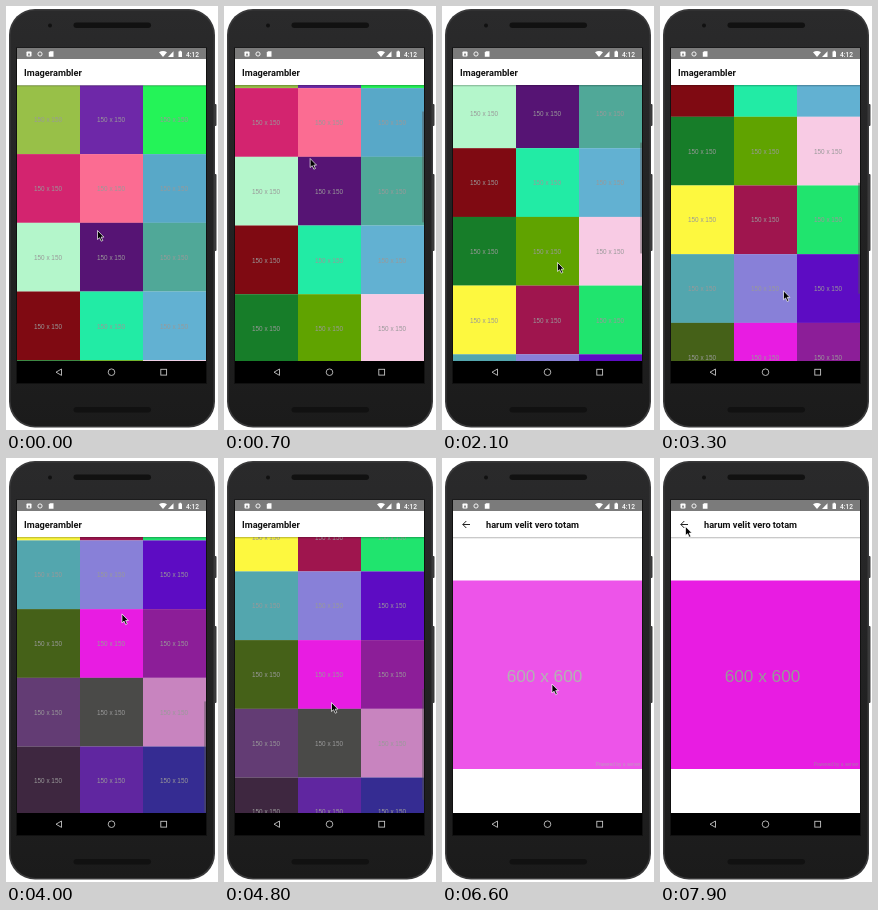
An HTML page that plays this animation: 212 by 424 pixels, repeating every 8 s.

```html
<!DOCTYPE html>
<html lang="en">
<head>
<meta charset="utf-8">
<title>Photo grid</title>
<style>
  html, body { margin: 0; width: 100%; height: 100%; overflow: hidden; background: #fff; }
  svg { display: block; width: 100%; height: 100%; }
  .title { font: 700 9.2px Roboto, sans-serif; fill: #111; }
  .label { font-family: "Liberation Sans", Arial, sans-serif; fill: #999; text-anchor: middle; }
  .clock { font: 500 6.6px Roboto, sans-serif; fill: #fff; }
  .mark { font: 4.9px "Liberation Sans", Arial, sans-serif; fill: #a77ba6; text-anchor: end; }
</style>
</head>
<body>
<svg viewBox="0 0 212 424">
  <defs>
    <clipPath id="listArea"><rect x="11" y="79" width="189" height="276"/></clipPath>
    <clipPath id="appArea"><rect x="11" y="53" width="189" height="302"/></clipPath>
    <linearGradient id="shade" x2="0" y2="1">
      <stop stop-color="#000" stop-opacity=".28"/>
      <stop offset="1" stop-color="#000" stop-opacity="0"/>
    </linearGradient>
    <linearGradient id="body" x2="0" y2="1">
      <stop stop-color="#2a2a2b"/>
      <stop offset="1" stop-color="#1b1b1b"/>
    </linearGradient>
  </defs>

  <!-- Phone -->
  <g fill="#3a3a3b">
    <rect x="206" y="98" width="4.5" height="22" rx="1"/>
    <rect x="206" y="168" width="4.5" height="77" rx="1"/>
  </g>
  <rect x="3" y="3" width="206" height="418.5" rx="26" fill="#3a3a3b"/>
  <rect x="4.5" y="4.5" width="203" height="415.5" rx="25" fill="url(#body)"/>
  <g fill="#111">
    <rect x="67.5" y="16.5" width="77.5" height="5.5" rx="2.75"/>
    <rect x="67.5" y="401" width="77.5" height="5.5" rx="2.75"/>
    <circle cx="44" cy="19.5" r="2"/>
  </g>
  <rect x="10" y="41.5" width="191" height="336.5" fill="#111"/>

  <!-- App: grid page and detail page -->
  <rect x="11" y="53" width="189" height="302" fill="#fff"/>
  <g clip-path="url(#listArea)">
    <g id="grid"></g>
    <rect id="thumb" x="198.2" width="1.8" fill="#555" fill-opacity=".5"/>
  </g>
  <rect x="11" y="79" width="189" height="2" fill="url(#shade)"/>
  <text class="title" x="18" y="70">Imagerambler</text>

  <g clip-path="url(#appArea)">
    <g id="detail">
      <rect x="11" y="53" width="189" height="352" fill="#fff"/>
      <rect x="11" y="79" width="189" height="2" fill="url(#shade)"/>
      <path d="M28 66.5H20.8M24.3 63L20.8 66.5L24.3 70" fill="none" stroke="#222"/>
      <text class="title" x="44" y="70">harum velit vero totam</text>
      <g id="photo">
        <rect x="11" y="122.5" width="189" height="188.5" fill="#e81ce2"/>
        <text class="label" x="102.5" y="223.5" font-size="17.2">600 x 600</text>
        <text class="mark" x="198.5" y="308">Powered by a server</text>
      </g>
    </g>
  </g>

  <!-- Status bar -->
  <rect x="11" y="42" width="189" height="11" fill="#7b7b7b"/>
  <g fill="#fff">
    <rect x="20.5" y="45.5" width="5" height="5" rx=".8"/>
    <path d="M23 46.6L21.7 49.5H24.3Z" fill="#7b7b7b"/>
    <circle cx="34" cy="48" r="2.1" fill="none" stroke="#fff" stroke-width=".9"/>
    <path d="M44 45.3H47.5V50.7H42.8V46.6Z"/>
    <path d="M153 46.3Q157 43.5 161 46.3L157 51Z"/>
    <path d="M167.5 45.3V51H162Z"/>
    <path d="M172.5 45.5H173.5V44.8H175V45.5H176V51H172.5Z"/>
  </g>
  <text class="clock" x="180" y="50.5">4:12</text>

  <!-- Navigation bar -->
  <rect x="11" y="355" width="189" height="22" fill="#000"/>
  <g fill="none" stroke="#c4c4c4" stroke-width=".9">
    <path d="M55.5 363V369.4L50 366.2Z"/>
    <circle cx="105.5" cy="366.2" r="3.3"/>
    <rect x="154.8" y="363.3" width="5.8" height="5.8"/>
  </g>

  <path id="cursor" d="M0 0V9L2.1 7.2L3.7 10.7L5.3 10L3.7 6.6H6.4Z"
        fill="#000" stroke="#fff" stroke-width=".7"/>
</svg>

<script>
const LOOP = 8000, STEP = 100;
const LIST_TOP = 79.4, ROW = 68.7, COLUMN = 63, VIEW = 276, SLOP = 6;

const rows = [
  "#98c048 #6e28a8 #24f358",
  "#d3246f #fb6c92 #58a8c8",
  "#b4f6cb #561474 #50a898",
  "#7f0a12 #22eba5 #62b1d2",
  "#177d29 #60a300 #f8cbe4",
  "#fdf83f #9f154e #20e46e",
  "#53a6ae #8880d8 #5d0cc3",
  "#456118 #e81ce2 #8c1e98",
  "#633c74 #4a4a48 #c884bf",
  "#3e2740 #6026a0 #352c92",
];
const listHeight = rows.length * ROW;

// Pointer strokes; a drag also scrolls the list, and the pointer glides between strokes.
const stroke = (start, end, from, to, drag = true) => ({ start, end, from, to, drag });
const strokes = [
  stroke(200, 900, [91.5, 224.5], [84, 123.7]),
  stroke(1800, 2380, [115, 311], [116, 205.6]),
  stroke(3200, 3600, [124, 340], [122, 119]),
  stroke(4500, 4800, [107.5, 207.5], [107.5, 244.5]),
  stroke(5400, 7100, [110, 226], [110, 226], false),
  stroke(7900, LOOP, [25.5, 68.5], [25.5, 68.5], false),
];

const clamp = v => Math.min(1, Math.max(0, v));
const progress = (t, start, end) => clamp((t - start) / (end - start));
const smooth = p => p * p * (3 - 2 * p);
const mix = (a, b, p) => a.map((v, i) => v + (b[i] - v) * p);

function pointerAt(t) {
  const next = strokes.findIndex(s => t <= s.end);
  const { start, end, from, to } = strokes[next];
  if (t >= start) return mix(from, to, progress(t, start, end));
  if (next === 0) return from;
  const last = strokes[next - 1];
  return mix(last.to, from, smooth(progress(t, last.end, start)));
}

function scrollAt(t) {
  return strokes.filter(s => s.drag).reduce((scroll, s) => {
    const pull = (s.from[1] - s.to[1]) * progress(t, s.start, s.end);
    const moved = Math.sign(pull) * Math.max(0, Math.abs(pull) - SLOP);
    return Math.min(listHeight - VIEW, scroll + moved);
  }, 0);
}

function thumbOpacityAt(t) {
  const last = strokes.filter(s => s.drag && t > s.start).pop();
  return last ? 1 - progress(t, last.end + 400, last.end + 750) : 0;
}

const byId = id => document.getElementById(id);
const grid = byId("grid"), thumb = byId("thumb"), detail = byId("detail");
const photo = byId("photo"), cursor = byId("cursor");

grid.innerHTML = rows.map((row, r) => row.split(" ").map((color, c) => {
  const x = 11 + c * COLUMN, y = LIST_TOP + r * ROW;
  return `<rect x="${x}" y="${y}" width="${COLUMN + 0.1}" height="${ROW + 0.1}" fill="${color}"/>
    <text class="label" x="${x + 31}" y="${y + 37}" font-size="6.4">150 x 150</text>`;
}).join("")).join("");
thumb.setAttribute("height", VIEW * VIEW / listHeight);

const moveTo = (node, x, y) => node.setAttribute("transform", `translate(${x} ${y})`);
const fade = (node, opacity) => node.setAttribute("opacity", opacity);

function render(now) {
  const t = Math.floor((now % LOOP) / STEP) * STEP;
  const scroll = scrollAt(t);
  const hidden = (1 - progress(t, 6000, 6300)) ** 2.4;

  moveTo(grid, 0, -scroll);
  thumb.setAttribute("y", 79 + scroll * VIEW / listHeight);
  fade(thumb, thumbOpacityAt(t));
  moveTo(detail, 0, 24 * hidden);
  fade(detail, 1 - hidden);
  fade(photo, progress(t, 6300, 6700));
  moveTo(cursor, ...pointerAt(t));
}

const start = performance.now();
function tick() {
  render(performance.now() - start);
  requestAnimationFrame(tick);
}
tick();
</script>
</body>
</html>
```
